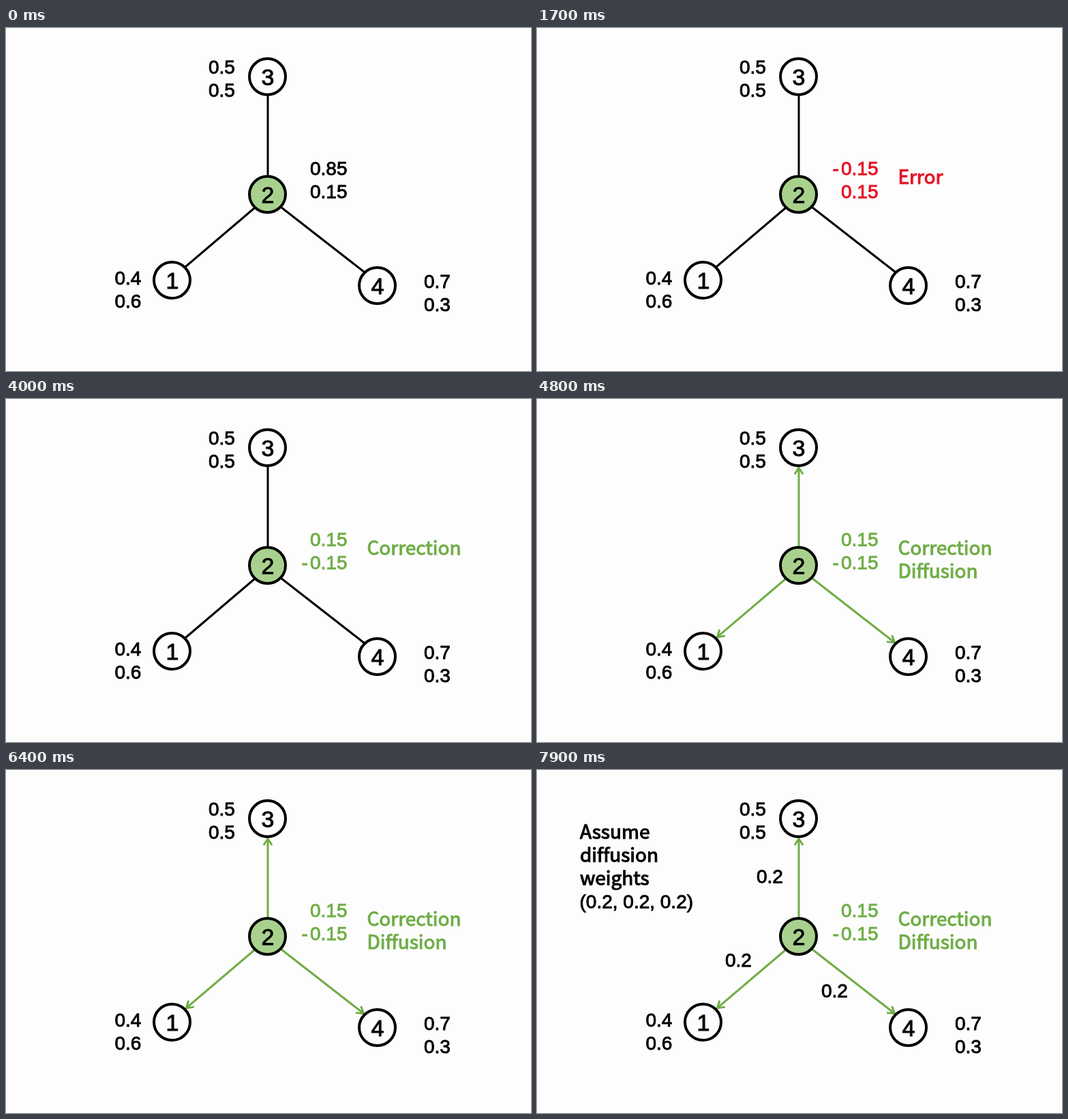
Write an HTML page that moves like this. It is 770x504 px and loops after 8 s.

```html
<!DOCTYPE html>
<html lang="en">
<head>
<meta charset="utf-8">
<title>Correction diffusion</title>
<style>
  html, body { margin: 0; width: 100%; height: 100%; overflow: hidden; background: #fdfdfd; }
  svg { display: block; width: 770px; height: 504px; }
  text { font-size: 28px; stroke: currentColor; stroke-width: .9; fill: currentColor; font-variant-ligatures: none; }
  .num { font-family: "Liberation Sans", Arial, sans-serif; }
  .word { font-family: "Noto Sans CJK SC", "Noto Sans CJK JP", "Noto Sans", sans-serif; font-weight: 500; stroke-width: 1.1; }
  .id { font-size: 34px; text-anchor: middle; }
  .edge { fill: none; stroke: currentColor; stroke-width: 3; }
  .tip { stroke-linecap: round; stroke-linejoin: round; }
</style>
</head>
<body>
<svg id="stage" viewBox="0 0 770 504"></svg>
<script>
const LOOP = 8000;
const ERROR_AT = 1000, FIX_AT = 3500, SPREAD_AT = 4700, WEIGHTS_AT = 6800;
const BLACK = '#000', RED = '#e71224', GREEN = '#70ad47', PALE_GREEN = '#a9d18e';
const stage = document.getElementById('stage');

function make(tag, attrs, parent, content) {
  const el = document.createElementNS('http://www.w3.org/2000/svg', tag);
  for (const key in attrs) el.setAttribute(key, attrs[key]);
  if (content) el.textContent = content;
  parent.appendChild(el);
  return el;
}

const phases = [];
function phase(start, end, color) {
  const el = make('g', { color }, stage);
  phases.push({ el, start, end });
  return el;
}

// Lines of text stacked 34px apart
function lines(parent, kind, x, y, rows) {
  rows.forEach((row, i) => make('text', { class: kind, x, y: y + 34 * i }, parent, row));
}

function signed(parent, values) {
  values.forEach((value, i) => {
    const y = 216 + 34 * i;
    if (value < 0) make('text', { class: 'num', x: 433.5, y }, parent, '-');
    make('text', { class: 'num', x: 446, y }, parent, Math.abs(value).toString());
  });
}

const edges = [
  [384, 217, 384, 99],
  [365, 264, 263, 351],
  [403, 263, 526, 359]
];

function drawEdges(parent, arrows) {
  for (const [x1, y1, x2, y2] of edges) {
    const turn = Math.atan2(y2 - y1, x2 - x1) * 180 / Math.PI;
    const len = Math.hypot(x2 - x1, y2 - y1);
    const g = make('g', { transform: `translate(${x2} ${y2}) rotate(${turn})` }, parent);
    make('path', { class: 'edge', d: `M${-len} 0H${arrows ? -2 : 0}` }, g);
    if (arrows) make('path', { class: 'edge tip', d: 'M-10.5 -5.5L-2 0L-10.5 5.5' }, g);
  }
}

drawEdges(phase(0, SPREAD_AT, BLACK), false);
drawEdges(phase(SPREAD_AT, LOOP, GREEN), true);

const base = phase(0, LOOP, BLACK);
const nodes = [
  [243.5, 370.5, '1', 'none'],
  [383.5, 244.5, '2', PALE_GREEN],
  [383.5, 71.5, '3', 'none'],
  [544.5, 378.5, '4', 'none']
];
for (const [cx, cy, id, fill] of nodes) {
  make('circle', { cx, cy, r: 26.5, fill, stroke: BLACK, 'stroke-width': 4 }, base);
  make('text', { class: 'num id', x: cx + .5, y: cy + 12 }, base, id);
}
lines(base, 'num', 297, 67, ['0.5', '0.5']);
lines(base, 'num', 159.5, 377, ['0.4', '0.6']);
lines(base, 'num', 613, 382, ['0.7', '0.3']);

lines(phase(0, ERROR_AT, BLACK), 'num', 446, 216, ['0.85', '0.15']);

const error = phase(ERROR_AT, FIX_AT, RED);
signed(error, [-0.15, 0.15]);
lines(error, 'word', 529.5, 229, ['Error']);

const fix = phase(FIX_AT, LOOP, GREEN);
signed(fix, [0.15, -0.15]);
lines(fix, 'word', 529.5, 229, ['Correction']);

lines(phase(SPREAD_AT, LOOP, GREEN), 'word', 529.5, 263, ['Diffusion']);

const weights = phase(WEIGHTS_AT, LOOP, BLACK);
lines(weights, 'word', 63, 101, ['Assume', 'diffusion', 'weights']);
lines(weights, 'num', 62.5, 203, ['(0.2, 0.2, 0.2)']);
for (const [x, y] of [[322, 166], [276, 289], [417, 334]]) lines(weights, 'num', x, y, ['0.2']);

function render(t) {
  for (const { el, start, end } of phases) {
    el.setAttribute('visibility', t >= start && t < end ? 'visible' : 'hidden');
  }
}

const origin = performance.now();
function tick() {
  render((performance.now() - origin) % LOOP);
  requestAnimationFrame(tick);
}
render(0);
requestAnimationFrame(tick);
</script>
</body>
</html>
```
